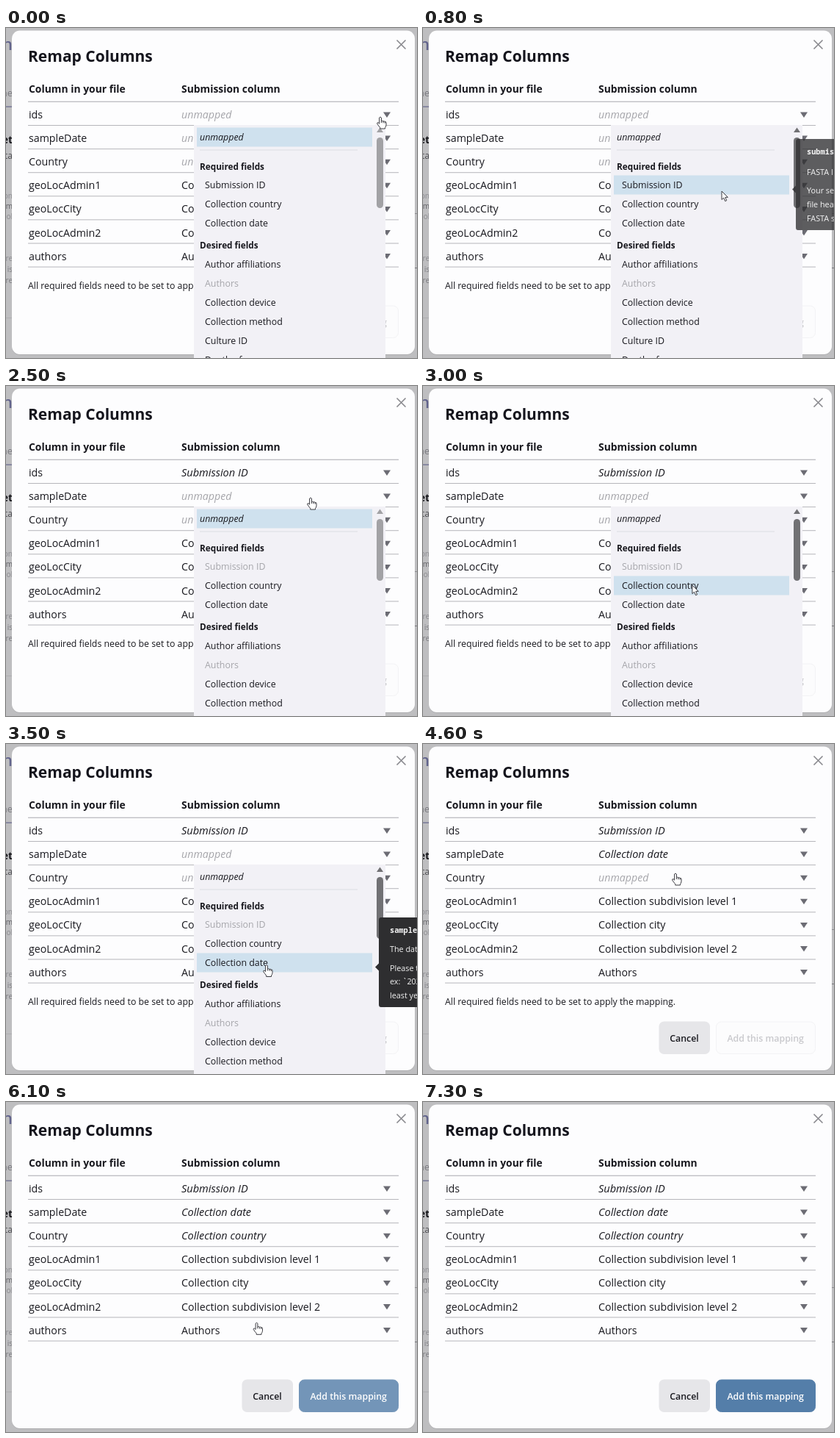
These frames come from a looping animation (560x449 px, 7400 ms). An HTML page:

```html
<!DOCTYPE html>
<html lang="en">
<head>
<meta charset="utf-8">
<title>Remap Columns</title>
<style>
html, body { margin: 0; width: 100%; height: 100%; overflow: hidden; background: #bebec0; }
svg { display: block; width: 560px; height: 449px; font-family: "Open Sans", "Noto Sans", sans-serif; fill: #18181e; }
.title { font-size: 21px; font-weight: 700; fill: #15151d; }
.head { font-size: 13.9px; font-weight: 700; }
.row { font-size: 14.2px; }
.picked { font-size: 14.55px; font-style: italic; }
.opt { font-size: 12.4px; }
.group { font-size: 11.75px; font-weight: 700; }
.note { font-size: 12.32px; }
.btn { font-size: 12.35px; font-weight: 600; }
.tip { font-size: 10.8px; fill: #f4f4f4; }
.code { font-family: "Noto Sans Mono", "DejaVu Sans Mono", monospace; font-size: 10.3px; font-weight: 600; fill: #f4f4f4; }
.ital { font-style: italic; }
.dim { fill: #a5a5aa; }
</style>
</head>
<body>
<svg id="stage" viewBox="0 0 560 449"></svg>
<script>
const LOOP = 7400, STEP = 100;
const stage = document.getElementById('stage');

function add(parent, tag, attrs = {}, content = '') {
  const node = document.createElementNS('http://www.w3.org/2000/svg', tag);
  for (const key in attrs) node.setAttribute(key, attrs[key]);
  node.textContent = content;
  return parent.appendChild(node);
}
const text = (parent, x, y, cls, content, more) =>
  add(parent, 'text', { x, y, class: cls, ...more }, content);
const rect = (parent, x, y, width, height, fill, more) =>
  add(parent, 'rect', { x, y, width, height, fill, ...more });
const path = (parent, d, fill, more) => add(parent, 'path', { d, fill, ...more });
const show = (node, on) => node.setAttribute('display', on ? 'inline' : 'none');

// Dimmed page behind the dialog
const page = add(stage, 'g');
const scraps = [
  ['n', 30, 22, '#62648c', 600], ['ne', 93, 13, '#77777c'], ['et', 157, 14, '#18181c', 700],
  ['ta', 178, 12, '#4c4c50'], ['on', 232, 10, '#8b8b8f'], ['rm', 246, 10, '#5d5d61'],
  ['ol', 260, 10, '#8b8b8f'], ['ore', 317, 10, '#8b8b8f'], ['is', 332, 10, '#7b7b7f'],
  ['l re', 347, 10, '#7b7b7f']
];
for (const [word, y, size, fill, weight = 400] of scraps)
  text(page, 9, y, '', word, { 'font-size': size, fill, 'font-weight': weight, 'text-anchor': 'end' });
rect(page, 0, 106.5, 9, 1.2, '#66678c');
rect(page, 0, 394, 9, 1, '#aeaeb1');
rect(page, 557, 252, 3, 1, '#8b8b8f');
rect(page, 557, 326, 3, 1, '#77777b');

// Dialog
rect(stage, 8, 5, 549, 440, '#000', { rx: 11, opacity: .08 });
rect(stage, 8, 3.5, 549, 440.5, '#fdfdfe', { rx: 11 });
text(stage, 30, 46, 'title', 'Remap Columns');
path(stage, 'M532.5 16.5 L544.5 28.5 M544.5 16.5 L532.5 28.5', 'none', { stroke: '#89898e', 'stroke-width': 1.6 });
text(stage, 31, 88, 'head', 'Column in your file');
text(stage, 239, 88, 'head', 'Submission column');

const rows = [
  ['ids', 'Submission ID', 1300], ['sampleDate', 'Collection date', 3700],
  ['Country', 'Collection country', 6000], ['geoLocAdmin1', 'Collection subdivision level 1'],
  ['geoLocCity', 'Collection city'], ['geoLocAdmin2', 'Collection subdivision level 2'],
  ['authors', 'Authors']
];
const rowY = i => 118 + 32.1 * i;
const choices = [];
rect(stage, 30, 99.7, 505, 1, '#a9a9ae');
rows.forEach(([name, value, setAt], i) => {
  const y = rowY(i);
  text(stage, 31, y + 5, 'row', name);
  const done = text(stage, 239, y + 5, setAt ? 'picked' : 'row', value);
  if (setAt) choices.push({ done, setAt, empty: text(stage, 239, y + 5, 'row ital dim', 'unmapped') });
  path(stage, `M514 ${y - 3.5} h10 l-5 7.5 z`, '#6c6c74');
  rect(stage, 30, y + 14, 505, 1, '#b6b6bb');
});

const note = text(stage, 30, 354.5, 'note', 'All required fields need to be set to apply the mapping.');
rect(stage, 321.5, 377.5, 69.5, 44.5, '#e6e6e9', { rx: 7 });
text(stage, 356, 405, 'btn', 'Cancel', { 'text-anchor': 'middle' });
function actionButton(fill, color, stroke) {
  const g = add(stage, 'g');
  rect(g, 399.5, 378, 135, 43.5, fill, { rx: 7, stroke });
  text(g, 466.7, 405, 'btn', 'Add this mapping', { 'text-anchor': 'middle', style: 'fill:' + color });
  return g;
}
const btnOff = actionButton('#fcfcfd', '#c9c9cd', '#f3f3f5');
const btnOn = actionButton('#547ea9', '#ffffff', '#547ea9');

// Option lists: offset of each line's centre from the list top
const lines = [
  ['unmapped', 16.5], ['Required fields', 56, 1], ['Submission ID', 81.5],
  ['Collection country', 107.5], ['Collection date', 133.5], ['Desired fields', 163.5, 1],
  ['Author affiliations', 189.5], ['Authors', 215.5], ['Collection device', 241.5],
  ['Collection method', 267.5], ['Culture ID', 293.5], ['Depth of coverage', 319.5]
];
const offset = Object.fromEntries(lines);

function makeList({ top, used, thumb }) {
  const g = add(stage, 'g');
  rect(g, 256, top, 261, 460 - top, '#f2f1f6');
  const mark = rect(g, 260, 0, 239, 26, '#cfe1ee');
  rect(g, 264, top + 33.5, 215, 1, '#dedee4');
  for (const [label, dy, isGroup] of lines) {
    const y = top + dy + 4.5;
    if (isGroup) text(g, 264, y, 'group', label);
    else if (label === 'unmapped') text(g, 264, y, 'opt ital', label);
    else text(g, 271, y, used.includes(label) ? 'opt dim' : 'opt', label);
  }
  const bar = add(g, 'g');
  add(bar, 'path', { d: `M505 ${top + 10} l4.5 -6.5 l4.5 6.5 z` });
  add(bar, 'rect', { x: 505, y: top + 17, width: 9, height: thumb, rx: 4.5 });
  return { g, mark, bar };
}

function makeTip(center, height, head, body) {
  const g = add(stage, 'g'), top = center - height / 2, y = center + 6.5;
  path(g, `M600 ${top} H511 q-3 0 -3 3 V${y - 5} l-5 5 l5 5 V${top + height - 3} q0 3 3 3 H600 z`, '#2e2e30');
  text(g, 523, top + 21, 'code', head);
  for (const [dy, words] of body) text(g, 523, top + dy, 'tip', words);
  return g;
}

const lists = [
  {
    top: 132, used: ['Authors'], thumb: 96, open: 0, close: 1300, tipAt: 500, fade: 390,
    marks: [[0, 'unmapped'], [400, ''], [500, 'Submission ID']],
    tip: [213, 124, 'submissionId', [[49, 'FASTA ID'], [74, 'Your sequence'], [93, 'file header or'], [112, 'FASTA sequence']]]
  },
  {
    top: 164, used: ['Authors', 'Submission ID'], thumb: 84, open: 2300, close: 3700, tipAt: 3200, fade: 300,
    marks: [[2300, 'unmapped'], [2800, ''], [2900, 'Collection country'], [3100, 'Collection date']],
    tip: [297, 122, 'sampleCollectionDate', [[47, 'The date on'], [73, 'Please type it'], [91, 'ex: `2024-01`'], [110, 'least year']]]
  },
  {
    top: 196, used: ['Authors', 'Submission ID', 'Collection date'], thumb: 73, open: 4800, close: 6000, tipAt: 5500, fade: 300,
    marks: [[4800, 'unmapped'], [5200, ''], [5300, 'Submission ID'], [5500, 'Collection country']],
    tip: [304, 82, 'geoLocCountry', [[47, 'The country'], [66, 'was collected']]]
  }
];
for (const list of lists) Object.assign(list, makeList(list));
for (const list of lists) list.tipBox = makeTip(...list.tip);

// Pointers, drawn with the hot spot at 0,0
const pen = { stroke: '#3a3a40', 'stroke-width': 1, 'stroke-linejoin': 'round' };
const arrow = path(stage, 'M0 0 V11.5 L2.7 9.1 L4.7 13.6 L6.7 12.7 L4.8 8.3 H8.4 Z', '#fff', pen);
const hand = add(stage, 'g');
path(hand, 'M-1.4 1 Q0 -1 1.4 1 V5.6 Q2.8 4.6 3.9 6 Q5.2 5.2 6.2 6.5 Q8 6 8 8 V11 Q7.8 13.2 6.5 14.5 V16 H-.3 V14.5 Q-2.5 12 -4.3 9.2 Q-4.6 7.3 -2.8 7.8 L-1.4 9.2 Z', '#fff', pen);
path(hand, 'M1.4 5.6 V8 M3.9 6 V8.3 M6.2 6.5 V8.6', 'none', pen);

// time, x, y; the pointer eases between them
const moves = [
  [0, 510, 121], [100, 510, 121], [800, 407, 222], [1000, 400, 215], [1500, 400, 215],
  [2100, 415, 152], [2500, 415, 152], [3200, 355, 300.5], [3800, 355, 300.5], [4100, 349, 208],
  [4400, 344, 176], [4800, 344, 176], [5400, 340, 293], [5600, 341.5, 300.3], [6200, 341.5, 300.3],
  [7000, 570, 395], [LOOP, 570, 395]
];
// time, whether the hand shows
const shapes = [[0, 1], [300, 0], [1000, 1], [2700, 0], [3200, 1], [5000, 0], [5500, 1], [6400, 0]];

const stepAt = (table, t) => table.filter(([at]) => at <= t).pop()[1];
const ramp = (t, from, length) => Math.max(0, Math.min(1, (t - from) / length));

function pointerAt(t) {
  const i = moves.findIndex(([at]) => at > t);
  const [t0, x0, y0] = moves[i - 1], [t1, x1, y1] = moves[i];
  const k = ramp(t, t0, t1 - t0), e = k * k * (3 - 2 * k);
  return [x0 + (x1 - x0) * e, y0 + (y1 - y0) * e];
}

function draw(t) {
  for (const { done, empty, setAt } of choices) {
    show(done, t >= setAt);
    show(empty, t < setAt);
  }
  for (const list of lists) {
    const open = t >= list.open && t < list.close;
    show(list.g, open);
    show(list.tipBox, open && t > list.tipAt);
    if (!open) continue;
    const name = stepAt(list.marks, t);
    show(list.mark, name);
    if (name) list.mark.setAttribute('y', list.top + offset[name] - 13);
    list.bar.setAttribute('fill', name === 'unmapped' ? '#a2a2a5' : '#717174');
    list.tipBox.setAttribute('opacity', ramp(t, list.tipAt, list.fade));
  }
  const ready = t >= 6000;
  show(note, !ready);
  show(btnOff, !ready);
  show(btnOn, ready);
  btnOn.setAttribute('opacity', ramp(t, 5900, 245));

  const isHand = stepAt(shapes, t), [x, y] = pointerAt(t);
  show(hand, isHand);
  show(arrow, !isHand);
  (isHand ? hand : arrow).setAttribute('transform', `translate(${x.toFixed(1)} ${y.toFixed(1)})`);
}

const start = performance.now();
function tick() {
  const t = (performance.now() - start) % LOOP;
  draw(Math.floor(t / STEP) * STEP);
  requestAnimationFrame(tick);
}
tick();
</script>
</body>
</html>
```
